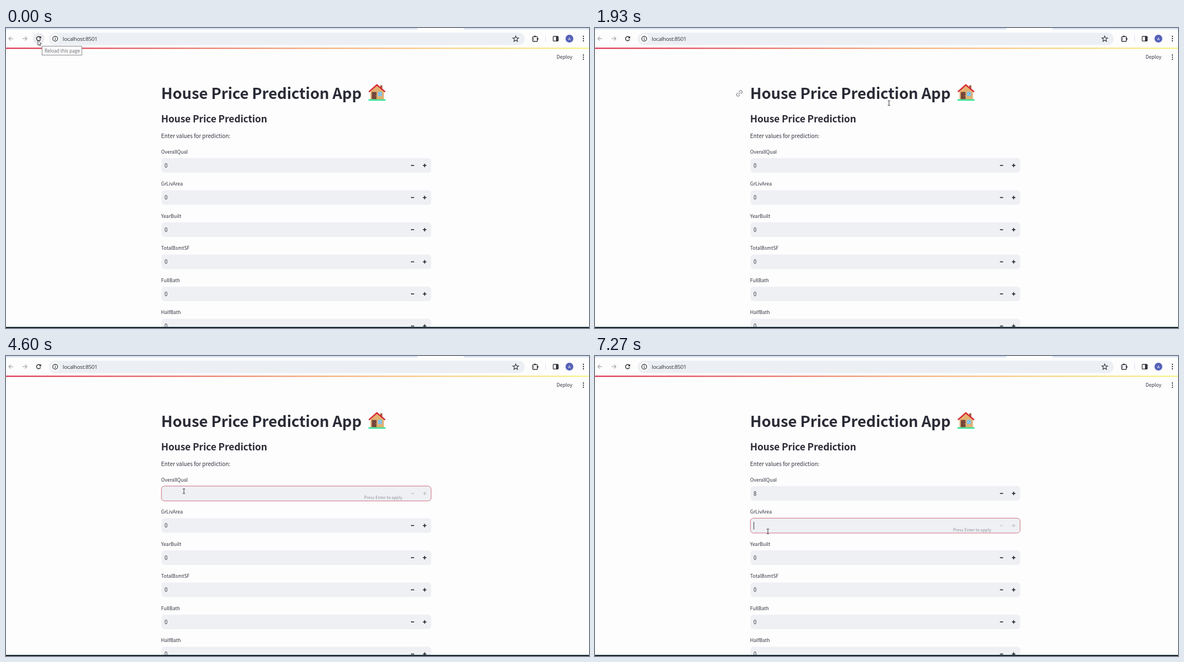
An HTML page with a canvas for the animation above (8000 ms loop, 1042 by 537 pixels).

```html
<!DOCTYPE html>
<html lang="en">
<head>
<meta charset="utf-8">
<title>House Price Prediction App</title>
<style>
html, body { margin: 0; width: 100%; height: 100%; overflow: hidden; background: #fdfdfd; }
canvas { display: block; width: 1042px; height: 537px; }
</style>
</head>
<body>
<canvas id="stage"></canvas>
<script>
const W = 1042, H = 537, LOOP = 8000;
const SANS = '"Noto Sans CJK JP", "Noto Sans CJK SC", "Noto Sans CJK", sans-serif';
const UI = '"Open Sans", sans-serif';
const INK = '#31333f', HEADING = '#2a2b36', FIELD = '#eef0f4', TABS = '#d8e3f3';
const FIRST_ROW = 246, ROW_STEP = 57.5;
const LABELS = ['OverallQual', 'GrLivArea', 'YearBuilt', 'TotalBsmtSF', 'FullBath', 'HalfBath'];

const canvas = document.getElementById('stage');
const ctx = canvas.getContext('2d');
const ratio = window.devicePixelRatio || 1;
canvas.width = W * ratio;
canvas.height = H * ratio;

const clamp = v => Math.max(0, Math.min(1, v));
const ramp = (t, from, to) => clamp((t - from) / (to - from));
const between = (t, from, to) => t >= from && t < to;
const inBox = (p, x, y, r, b) => p.x >= x && p.x <= r && p.y >= y && p.y <= b;

function text(str, x, y, size, { color = INK, weight = 400, family = SANS, spacing = 0, align = 'left' } = {}) {
  ctx.font = `${weight} ${size}px ${family}`;
  ctx.letterSpacing = spacing + 'px';
  ctx.textAlign = align;
  ctx.fillStyle = color;
  ctx.fillText(str, x, y);
}

function rect(x, y, w, h, color) {
  ctx.fillStyle = color;
  ctx.fillRect(x, y, w, h);
}

function rounded(x, y, w, h, r, fill, stroke, width = 1) {
  ctx.beginPath();
  ctx.roundRect(x, y, w, h, r);
  paint(fill, stroke, width);
}

function disc(x, y, r, fill, stroke, width = 1) {
  ctx.beginPath();
  ctx.arc(x, y, r, 0, Math.PI * 2);
  paint(fill, stroke, width);
}

function shape(points, fill, stroke, width = 1, close = true) {
  ctx.beginPath();
  points.forEach(([x, y]) => ctx.lineTo(x, y));
  if (close) ctx.closePath();
  paint(fill, stroke, width);
}

function paint(fill, stroke, width) {
  if (fill) { ctx.fillStyle = fill; ctx.fill(); }
  if (stroke) { ctx.strokeStyle = stroke; ctx.lineWidth = width; ctx.stroke(); }
}

const line = (points, color, width) => shape(points, null, color, width, false);

function kebab(x, y, gap) {
  for (const k of [-1, 0, 1]) disc(x, y + k * gap, 1.15, '#33353c');
}

function navArrow(x, dir) {
  line([[x - 4, 19], [x + 4, 19]], '#a3a5a8', 1.2);
  line([[x + dir * 0.5, 15.3], [x + dir * 4, 19], [x + dir * 0.5, 22.7]], '#a3a5a8', 1.2);
}

function reloadIcon(hover) {
  if (hover) disc(58.5, 19, 10.5, '#ebecef');
  ctx.beginPath();
  ctx.arc(58.3, 19, 3.7, 0.35, Math.PI * 1.8);
  paint(null, '#2c2e33', 1.4);
  shape([[62.8, 14.6], [62.8, 18.4], [59, 18.4]], '#2c2e33');
}

function star(x, y) {
  const points = Array.from({ length: 10 }, (_, i) => {
    const r = i % 2 ? 2.4 : 5.4, a = i * Math.PI / 5 - Math.PI / 2;
    return [x + r * Math.cos(a), y + r * Math.sin(a)];
  });
  shape(points, null, '#33353c', 1.1);
}

function puzzle() {
  rounded(941.5, 15.4, 8.2, 8.6, 1, null, '#33353c', 1.4);
  disc(945.4, 15, 1.6, '#33353c');
  disc(950.2, 19.6, 1.6, '#33353c');
  disc(941.8, 19.7, 1.3, '#fdfdfd', '#33353c', 1);
}

function browserBar(p) {
  rect(0, 0, W, 35, '#fdfdfd');
  rect(0, 0, 735, 2.6, TABS);
  rect(818, 0, W - 818, 2.6, TABS);
  navArrow(9, -1);
  navArrow(33.5, 1);
  reloadIcon(Math.hypot(p.x - 58, p.y - 19) < 11);
  rounded(76.5, 8.5, 850.5, 22, 11, '#ecf0f5');
  disc(88, 19.3, 8.2, '#fdfdfd');
  disc(88, 19.3, 4.4, null, '#2c2e33', 1.2);
  rect(87.4, 18.6, 1.2, 3.1, '#2c2e33');
  rect(87.4, 16.7, 1.2, 1.2, '#2c2e33');
  text('localhost:8501', 101.5, 22.8, 9.8, { family: UI, color: '#303238', spacing: -0.3 });
  star(911, 19.6);
  puzzle();
  rect(964, 13, 1, 12, TABS);
  rounded(978, 15, 9, 8.4, 1, null, '#33353c', 1.3);
  rect(983, 15, 4, 8.4, '#33353c');
  disc(1007, 19, 7, '#5661b8');
  text('A', 1007, 21.9, 8, { family: UI, color: '#f2f3fb', align: 'center' });
  kebab(1032, 19, 4);

  const stripe = ctx.createLinearGradient(0, 0, W, 0);
  [[0, '#d9304f'], [0.25, '#e5605f'], [0.5, '#f2a078'], [0.75, '#f7cf80'], [1, '#f6f284']]
    .forEach(([at, color]) => stripe.addColorStop(at, color));
  rect(0, 35.2, W, 2.2, stripe);
}

function house() {
  rect(669, 102.5, 3.6, 8, '#a85a44');
  shape([[651.5, 128], [651.5, 113.5], [663, 102.5], [675.5, 113.5], [675.5, 128]], '#e3b071');
  line([[648.6, 114.4], [662.8, 101.8], [677.6, 114.4]], '#d5262e', 2.4);
  rect(653.8, 114.5, 8.4, 13, '#74463a');
  disc(660.6, 121.5, 0.7, '#d9a05a');
  rect(664.6, 114.2, 7.6, 7.8, '#86c3e6');
  rounded(647.7, 127.4, 31, 2.8, 1.3, '#3fe39b');
}

function linkIcon(x, y) {
  ctx.save();
  ctx.translate(x, y);
  ctx.rotate(-Math.PI / 4);
  for (const s of [-1, 1]) {
    ctx.beginPath();
    ctx.moveTo(s * 1.2, -2.6);
    ctx.lineTo(s * 3.4, -2.6);
    ctx.arc(s * 3.4, 0, 2.6, -Math.PI / 2, Math.PI / 2, s < 0);
    ctx.lineTo(s * 1.2, 2.6);
    paint(null, '#85868d', 1.1);
  }
  line([[-2.8, 0], [2.8, 0]], '#85868d', 1.1);
  ctx.restore();
}

function headings(p) {
  text('House Price Prediction App', 277.3, 127, 27.1, { weight: 700, spacing: -0.1, color: HEADING });
  house();
  text('House Price Prediction', 277.3, 168.6, 17.25, { weight: 700, spacing: -0.15, color: HEADING });
  text('Enter values for prediction:', 277.3, 197.4, 9.87);
  if (inBox(p, 278, 100, 760, 140)) linkIcon(258, 117);
  if (inBox(p, 278, 149, 760, 178)) linkIcon(258, 162);
}

function runner(t) {
  const c = '#a3a4aa', swing = Math.floor((t - 6670) / 100) % 2 ? 1.5 : 0;
  disc(874, 46.3, 1.6, c);
  line([[868.4, 49.6 + swing], [874, 49.8], [879.6, 49.6 - swing]], c, 1.6);
  rect(872, 49.2, 4, 5.4, c);
  line([[872.7, 54], [872.7 - swing, 59.5]], c, 1.5);
  line([[875.3, 54], [875.3 + swing, 59.5]], c, 1.5);
}

function status(t) {
  if (between(t, 6640, 7080)) {
    runner(t);
    text('RUNNING...', 888.3, 55.1, 8.64, { color: '#b4b5ba' });
    text('Stop', 947.8, 55.1, 8.64);
  }
  text('Deploy', 984, 55.1, 8.64);
  kebab(1032, 52.3, 3.8);
}

function field(label, y, { value = '0', focus = 0, caret = false, hint = false, enabled = 1 }) {
  text(label, 277.3, y - 21.3, 8.64);
  rounded(278, y - 13, 482, 26, 5.5, FIELD);
  if (focus > 0) {
    ctx.globalAlpha = focus;
    rounded(277.8, y - 13.2, 482, 26.6, 5.5, null, '#cf7080', 1);
    ctx.globalAlpha = 1;
  }
  text(value, 283.2, y + 3.7, 9.87);
  if (caret) rect(value ? 288.4 : 283.4, y - 6.5, 1, 13.5, '#31333f');
  if (hint) text('Press Enter to apply', 640, y + 10, 7.4, { color: '#92939b' });
  ctx.globalAlpha = 0.17 + 0.83 * enabled;
  rect(723.8, y - 0.8, 5.6, 1.6, '#24262e');
  rect(745.2, y - 0.8, 6.2, 1.6, '#24262e');
  rect(747.5, y - 3.1, 1.6, 6.2, '#24262e');
  ctx.globalAlpha = 1;
}

function firstField(t) {
  const cleared = between(t, 4200, 5600);
  return {
    value: cleared ? '' : t >= 5600 ? '8' : '0',
    focus: between(t, 3340, 6640) ? 0.75 + 0.25 * ramp(t, 3370, 3470) : 0,
    caret: [[3340, 3630], [4000, 4600], [5000, 6130]].some(([a, b]) => between(t, a, b)),
    hint: between(t, 4200, 6640),
    enabled: t < 4200 ? 1 : t < 5600 ? 1 - ramp(t, 4180, 4230) : ramp(t, 5580, 5730)
  };
}

function secondField(t) {
  const cleared = t >= 7200;
  return {
    value: cleared ? '' : '0',
    focus: t >= 6640 ? 0.85 + 0.15 * ramp(t, 6670, 6770) : 0,
    caret: t >= 6640,
    hint: cleared,
    enabled: 1 - ramp(t, 7190, 7260)
  };
}

// Pointer stops: time, x, y
const PATH = [[0, 57, 22], [30, 57, 22], [830, 215, 152], [1070, 266, 180], [1330, 266, 180],
  [2130, 573, 126], [2430, 394, 169], [2970, 318, 242], [6000, 318, 242], [6270, 309, 314]];

function pointerAt(t) {
  const i = PATH.findIndex(k => k[0] > t);
  if (i < 0) { const [, x, y] = PATH[PATH.length - 1]; return { x, y }; }
  const [t0, x0, y0] = PATH[i - 1], [t1, x1, y1] = PATH[i];
  const u = ramp(t, t0, t1), e = u * u * (3 - 2 * u);
  return { x: x0 + (x1 - x0) * e, y: y0 + (y1 - y0) * e };
}

function pointer(p) {
  const overText = inBox(p, 278, 100, 680, 135) || inBox(p, 278, 150, 462, 176) ||
    inBox(p, 278, 187, 401, 201) || inBox(p, 278, 233, 715, 259) || inBox(p, 278, 290, 715, 317);
  ctx.save();
  ctx.translate(p.x, p.y);
  if (overText) {
    line([[0, -4], [0, 4]], '#3b3c42', 1);
    for (const y of [-4.2, 4.2]) line([[-2.2, y], [2.2, y]], '#3b3c42', 0.9);
  } else {
    shape([[0, 0], [0, 9], [2, 7.2], [3.4, 10], [4.8, 9.4], [3.5, 6.6], [6.2, 6.4]], '#fdfdfd', '#34353b', 0.9);
  }
  ctx.restore();
}

function tooltip(t) {
  if (t >= 100) return;
  rect(64, 32.5, 72, 16.5, '#fbfbfb');
  ctx.strokeStyle = '#8b8c90';
  ctx.lineWidth = 1;
  ctx.strokeRect(64.5, 32.5, 71, 16);
  text('Reload this page', 69, 43.6, 8.2, { family: UI, color: '#66686d' });
}

function draw(t) {
  const p = pointerAt(t);
  ctx.setTransform(ratio, 0, 0, ratio, 0, 0);
  rect(0, 0, W, H, '#fdfdfd');
  browserBar(p);
  status(t);
  headings(p);
  const states = [firstField(t), secondField(t)];
  LABELS.forEach((label, i) => field(label, FIRST_ROW + i * ROW_STEP, states[i] || {}));
  rect(0, 535, W, 2, '#15262f');
  tooltip(t);
  pointer(p);
}

const start = performance.now();
function tick() {
  draw((performance.now() - start) % LOOP);
  requestAnimationFrame(tick);
}
tick();
</script>
</body>
</html>
```
